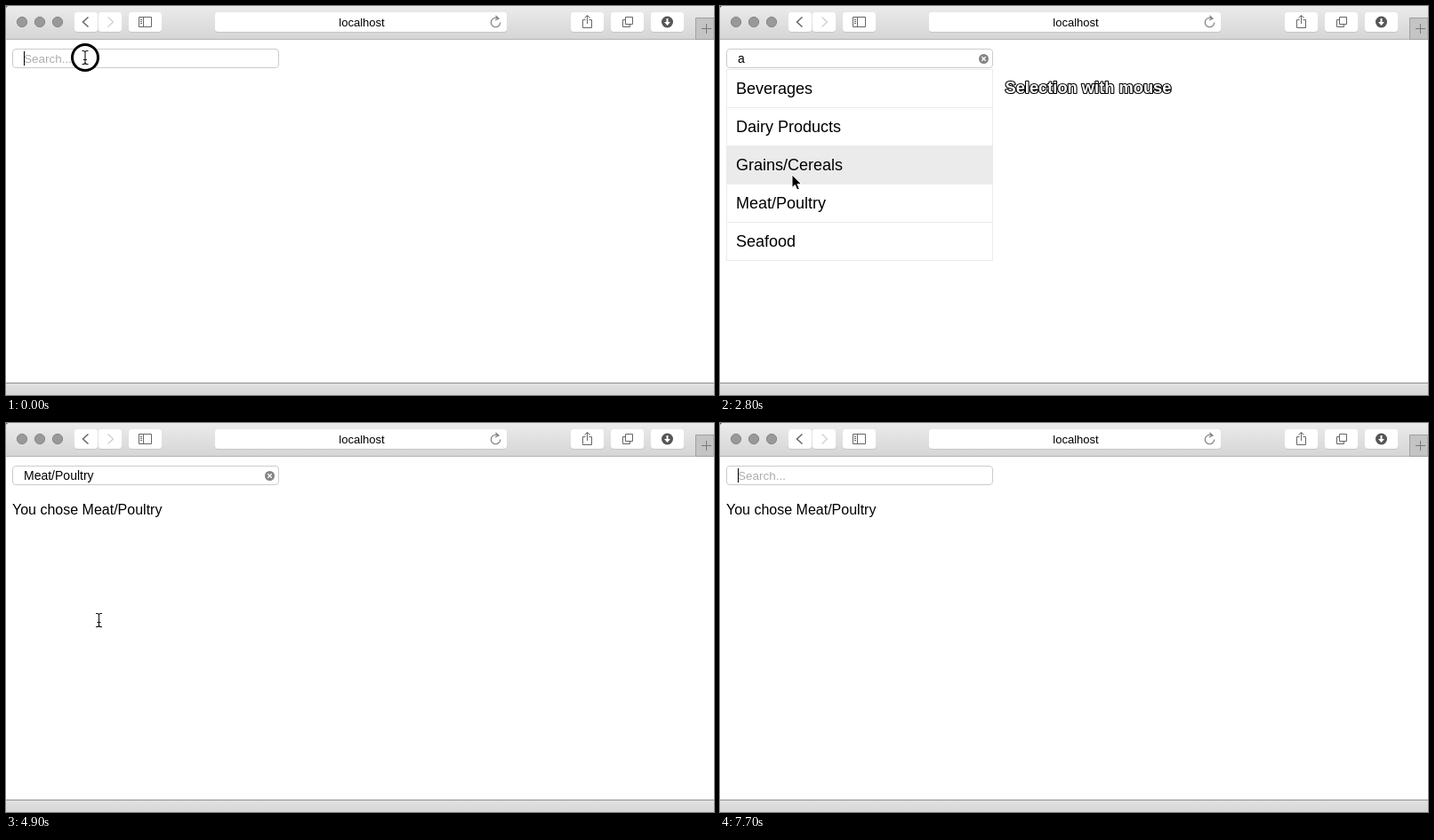
Write an HTML page that moves like this. It is 796 px wide and 438 px high and loops after 8 s.

```html
<!DOCTYPE html>
<html lang="en">
<head>
<meta charset="utf-8">
<title>Search suggestions</title>
<style>
  html, body { margin: 0; width: 100%; height: 100%; overflow: hidden; background: #fff; }
  svg { display: block; width: 796px; height: 438px; }
  text { font-family: "Liberation Sans", Arial, Helvetica, sans-serif; white-space: pre; }
  .line { fill: none; stroke: #666; }
  .item { font-size: 18px; }
  .title { font-size: 18.3px; font-weight: bold; fill: #fff; stroke: #000; stroke-width: 2.2px;
    stroke-linejoin: round; paint-order: stroke; }
</style>
</head>
<body>
<svg viewBox="0 0 796 438">
  <defs>
    <linearGradient id="bar" x2="0" y2="1">
      <stop stop-color="#ebebeb"/><stop offset="1" stop-color="#d5d5d5"/>
    </linearGradient>
    <linearGradient id="foot" x2="0" y2="1">
      <stop stop-color="#e2e2e2"/><stop offset="1" stop-color="#d6d6d6"/>
    </linearGradient>
    <path id="beam" d="M-3.5 -7.5H-2Q0 -7.5 0 -5.5Q0 -7.5 2 -7.5H3.5M0 -5.5V5.5M-3.5 7.5H-2Q0 7.5 0 5.5Q0 7.5 2 7.5H3.5M-2 2.5H2"/>
  </defs>

  <!-- browser window -->
  <rect width="796" height="38" fill="url(#bar)"/>
  <path d="M0 37.5H796" stroke="#b4b4b4"/>
  <path d="M0 0H2L0 2Z" fill="#555"/>
  <g id="lights" fill="#999" stroke="#858585"></g>
  <g id="buttons"></g>
  <path class="line" d="M92.5 12.5L86.5 18L92.5 23.5" stroke-width="1.5"/>
  <path d="M114.5 12.5L120.5 18L114.5 23.5" fill="none" stroke="#d2d2d2" stroke-width="1.4"/>
  <path class="line" d="M149.5 12.5H163.5V23.5H149.5ZM154.5 12.5V23.5M151 15.5H153M151 17.5H153M151 19.5H153"/>
  <text x="400" y="23" font-size="13" text-anchor="middle">localhost</text>
  <path d="M553.5 14.3A5.2 5.2 0 1 0 555.7 18.5M550.5 11L554 14.2L550 16" fill="none" stroke="#808080" stroke-width="1.2"/>
  <path class="line" d="M651.5 15.5H648.5V24.5H658.5V15.5H655.5M653.5 20V11M650.5 13.5L653.5 10.5L656.5 13.5"/>
  <path class="line" d="M696.5 15.5H693.5V23.5H701.5V20.5M696.5 12.5H704.5V20.5H696.5Z"/>
  <circle cx="743.5" cy="18" r="6.5" fill="#555"/>
  <path d="M742.5 14H744.5V18H747L743.5 22L740 18H742.5Z" fill="#fff"/>
  <path d="M775.5 38V13.5H796V37.5H775.5" fill="#c4c4c4" stroke="#a0a0a0"/>
  <path d="M782 25.5H793M787.5 20V31" stroke="#777"/>
  <rect y="424" width="796" height="14" fill="url(#foot)"/>
  <path d="M0 424.5H796" stroke="#8f8f8f"/>

  <!-- page -->
  <g id="list"></g>
  <rect x="7.5" y="48.5" width="299" height="21" rx="3.5" fill="#fff" stroke="#cbcbcb"/>
  <rect id="selection" x="20" y="51" width="80" height="17" fill="#b3d7ff"/>
  <text id="value" x="20" y="64"></text>
  <path id="caret" d="M.5 51V67" stroke="#000"/>
  <g id="clear">
    <circle cx="296.5" cy="59.5" r="5.5" fill="#858585"/>
    <path d="M294.3 57.3L298.7 61.7M298.7 57.3L294.3 61.7" stroke="#fff" stroke-width="1.3"/>
  </g>
  <text id="chosen" x="7" y="103" font-size="16">You chose Meat/Poultry</text>
  <text id="title" class="title" x="320.5" y="98">Selection with mouse</text>

  <!-- pointers -->
  <circle id="ring" cx="89" cy="58" r="14.5" fill="#fff" stroke="#000" stroke-width="3"/>
  <g id="ibeam" fill="none">
    <use href="#beam" stroke="#fff" stroke-width="2.4" stroke-opacity=".75"/>
    <use href="#beam" stroke="#111" stroke-width="1.1"/>
  </g>
  <path id="arrow" d="M0 0V14.5L3.3 11.5L5.7 17L8.3 15.9L6 10.5H10.5Z" fill="#000" stroke="#fff"/>
</svg>
<script>
const $ = id => document.getElementById(id);

function add(parent, tag, attrs, text = "") {
  const node = document.createElementNS("http://www.w3.org/2000/svg", tag);
  for (const key in attrs) node.setAttribute(key, attrs[key]);
  node.textContent = text;
  parent.append(node);
  return node;
}

for (const cx of [18, 38, 58]) add($("lights"), "circle", { cx, cy: 18, r: 5.6 });

for (const [x, width] of [[77, 26], [104, 26], [138, 37], [235, 328], [635, 37], [680, 37], [725, 37]]) {
  add($("buttons"), "rect", { x, y: 8, width, height: 22, rx: 3.5, fill: "#c6c6c6" });
  add($("buttons"), "rect", { x, y: 7, width, height: 22, rx: 3.5, fill: "#fff" });
}

const ROW = 43;
const rows = ["Beverages", "Dairy Products", "Grains/Cereals", "Meat/Poultry", "Seafood"].map((name, i) => {
  const y = 71 + i * ROW;
  const row = add($("list"), "rect", { x: 7.5, y: y + .5, width: 299, height: ROW, stroke: "#ebebeb" });
  add($("list"), "text", { x: 18, y: y + 28, class: "item" }, name);
  return row;
});

// Each step holds for STEP ms; unset parts are hidden.
const LOOP = 8000, STEP = 700;
const picked = { value: "Meat/Poultry", chosen: true };
const steps = [
  { caret: 20, beam: [89, 58], ring: true },
  { beam: [89, 58] },
  { caret: 20, beam: [89, 58] },
  { value: "a", caret: 27, list: true },
  { value: "a", list: true, hover: 2, arrow: [81, 190], title: true },
  { value: "a", caret: 27, list: true, hover: 3, beam: [104.5, 222], title: true },
  { ...picked, beam: [104.5, 222], title: true },
  { ...picked, beam: [104.5, 222] },
  { ...picked, beam: [110.5, 95] },
  { ...picked, beam: [110.5, 62], caret: 99 },
  { ...picked, beam: [110.5, 62], selection: true },
  { chosen: true, caret: 20 }
];

function show(id, on) {
  $(id).style.display = on ? "" : "none";
}

function place(id, point) {
  show(id, point);
  if (point) $(id).setAttribute("transform", `translate(${point})`);
}

function draw(s) {
  const value = $("value");
  value.textContent = s.value || "Search...";
  value.setAttribute("font-size", s.value ? 14 : 13.5);
  value.setAttribute("fill", s.value ? "#000" : "#aeaeae");
  for (const id of ["list", "chosen", "title", "ring", "selection"]) show(id, s[id]);
  show("clear", s.value);
  rows.forEach((row, i) => row.setAttribute("fill", i === s.hover ? "#ebebeb" : "#fff"));
  place("caret", s.caret && [s.caret, 0]);
  place("ibeam", s.beam);
  place("arrow", s.arrow);
}

const start = performance.now();
let current = -1;

function tick() {
  const time = (performance.now() - start) % LOOP;
  const index = Math.min(Math.floor(time / STEP), steps.length - 1);
  if (index !== current) draw(steps[current = index]);
  requestAnimationFrame(tick);
}
tick();
</script>
</body>
</html>
```
